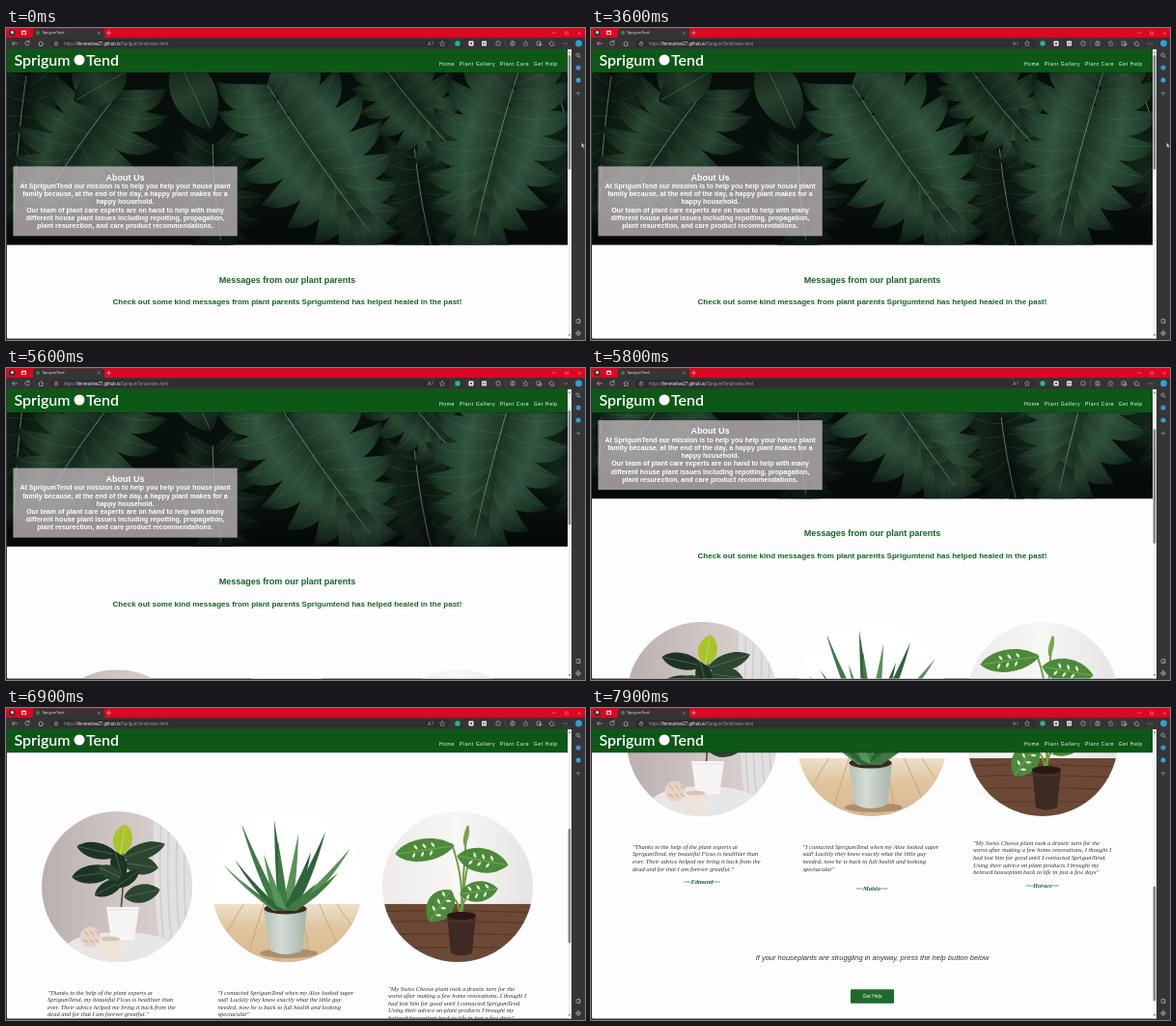
Recreate the animation shown at these times as an HTML page. Size 600 by 323 pixels, loop 8000 ms.

```html
<!DOCTYPE html>
<html lang="en">
<head>
<meta charset="utf-8">
<title>SprigumTend</title>
<style>
html, body { margin: 0; height: 100%; overflow: hidden; background: #333; }
svg { display: block; width: 100vw; height: 100vh; }
text { font-family: "Liberation Sans", Arial, sans-serif; white-space: pre; }
.serif { font-family: "Liberation Serif", "Times New Roman", serif; font-style: italic; }
.logo { font-family: Lato, "Open Sans", sans-serif; font-weight: 600; }
.mid { text-anchor: middle; }
.bold { font-weight: 700; }
.ital { font-style: italic; }
</style>
</head>
<body>
<svg id="stage" viewBox="0 0 600 323"></svg>
<script>
const { sin, PI } = Math;

// y is the vertical middle of the line
const text = (x, y, size, str, fill, cls = '', extra = '') =>
  `<text x="${x}" y="${y + size * .35}" font-size="${size}" fill="${fill}" class="${cls}" ${extra}>${str}</text>`;
const lines = (x, y, step, size, list, fill, cls) =>
  list.map((s, i) => text(x, y + i * step, size, s, fill, cls)).join('');
const rect = (x, y, w, h, fill, rx = 0) =>
  `<rect x="${x}" y="${y}" width="${w}" height="${h}" rx="${rx}" fill="${fill}"/>`;
const dot = (x, y, r, fill) => `<circle cx="${x}" cy="${y}" r="${r}" fill="${fill}"/>`;
const path = (d, fill) => `<path d="${d}" fill="${fill}"/>`;
const line = (d, stroke, width = .7) =>
  `<path d="${d}" fill="none" stroke="${stroke}" stroke-width="${width}" stroke-linecap="round"/>`;
const at = (x, y, body, turn = 0) => `<g transform="translate(${x} ${y}) rotate(${turn})">${body}</g>`;
const gradient = (id, stops, dir = 'x2="0" y2="1"') =>
  `<linearGradient id="${id}" ${dir}>${stops.map(([o, c]) => `<stop offset="${o}" stop-color="${c}"/>`).join('')}</linearGradient>`;

// A pointed leaf centred on x, y, half-length l and half-width w
const leaf = (x, y, l, w, turn, fill, vein = '#6d8a5d') =>
  at(x, y, path(`M${-l} 0C${-l * .6} ${-w * 1.4} ${l * .5} ${-w * 1.4} ${l} 0C${l * .5} ${w * 1.4} ${-l * .6} ${w * 1.4} ${-l} 0`, fill) +
    line(`M${-l * .9} 0H${l * .9}`, vein, .5), turn);

// A broad split leaf: blunt lobes along a midrib, each curving towards the tip
function frond(x, y, turn, len, width, n, tone) {
  let out = '';
  for (const side of [-1, 1]) for (let i = 0; i < n; i++) {
    const u = i / (n - 1), reach = width * (.6 + .45 * sin(PI * (.15 + .8 * u)));
    const h = len / n * .8, bend = -side * h * .6;
    const lobe = path(`M-2 ${-h * .6}C${reach * .4} ${-h * 1.2 + bend} ${reach * .85} ${-h + bend} ${reach} ${-bend}` +
      `C${reach * .8} ${h + bend} ${reach * .4} ${h * 1.2 + bend} -2 ${h * .6}`, `url(#${tone})`) +
      line(`M0 0Q${reach * .5} ${bend} ${reach * .9} ${-bend * .6}`, '#7d9a8055', .5);
    out += at(u * len * .85, 0, lobe, side * (128 - 108 * u));
  }
  return at(x, y, out + line(`M-10 0Q${len / 2} 4 ${len} 0`, '#6f8f72', .8), turn);
}

const hero = rect(1, 46, 581, 179, '#07100c') +
  frond(20, 60, 95, 130, 55, 8, 'deep') +
  frond(570, 60, 70, 150, 60, 8, 'deep') +
  frond(425, 135, 80, 100, 52, 8, 'deep') +
  frond(215, 130, 85, 90, 50, 7, 'deep') +
  frond(113, 72, 125, 125, 68, 8, 'dim') +
  frond(395, 44, 50, 110, 50, 8, 'dim') +
  leaf(98, 60, 32, 18, 150, 'url(#dim)') +
  leaf(195, 68, 42, 22, 65, 'url(#dim)') +
  frond(277, 68, 55, 175, 74, 9, 'lit') +
  frond(528, 56, 105, 165, 72, 9, 'lit') +
  rect(1, 46, 581, 179, 'url(#shade)');

const about = `<g opacity=".8">${rect(7.4, 143.3, 232.3, 72, '#bdb4b8')}</g>` +
  text(123.5, 154.5, 9, 'About Us', '#fff', 'mid bold') +
  lines(123.5, 163.6, 8.2, 7.04, [
    'At SprigumTend our mission is to help you help your house plant',
    'family because, at the end of the day, a happy plant makes for a',
    'happy household.',
    'Our team of plant care experts are on hand to help with many',
    'different house plant issues including repotting, propagation,',
    'plant resurection, and care product recommendations.'], '#fff', 'mid bold');

const ficus = rect(-78, -78, 156, 156, 'url(#wall)') +
  path('M38-78H78V78H46Q36 0 38-78', '#e2dfe0') +
  [46, 54, 63, 71].map(x => line(`M${x}-70Q${x - 4} 0 ${x + 3} 60`, '#cfcbce', 1.5)).join('') +
  `<ellipse cx="3" cy="63" rx="55" ry="16" fill="#e9e6e6"/>` +
  line('M4 26Q8-10 6-55', '#5b4a33', 1.6) +
  [[-20, -37, 22, 8, 12], [28, -37, 23, 8, -18], [-24, -13, 23, 9, -8], [25, -22, 18, 9, 8],
   [-8, 1, 17, 7, -28], [26, 7, 19, 9, -12], [2, -22, 15, 8, 75], [-6, -14, 15, 7, 25], [11, -8, 15, 6, -35]]
    .map(([x, y, l, w, r], i) => leaf(x, y, l, w, r, i % 2 ? '#2b4531' : '#1d3326')).join('') +
  leaf(6, -49, 16, 9.5, -80, '#a9c32c', '#dbe477') +
  path('M-11 21H23L18 55H-6Z', '#f6f5f4') + line('M-10 24H22', '#dcd8d6') +
  dot(-28, 52, 10.5, '#e6d3c6') +
  [-34, -28, -22].map(x => line(`M${x} 46l4 4m-4 5l4 3`, '#c59c8b', 1)).join('') +
  rect(-18, 53, 22, 22, '#eee3d7', 3) + `<ellipse cx="-7" cy="54" rx="10" ry="2.5" fill="#d7c4b2"/>`;

const spikes = [[-48, -68], [-13, -69], [12, -55], [-9, -47], [40, -57], [66, -40], [53, -14], [-54, -28],
  [-66, -23], [-47, -6], [25, -36], [-24, -34], [30, -3], [-29, 8]];
const aloe = rect(-78, -78, 156, 156, '#fff') + rect(-78, 18, 156, 60, 'url(#wood)') +
  [-64, -34, -8, 20, 48, 74].map(x => line(`M${x * .7} 18L${x * 1.25} 78`, '#bfa078', .8)).join('') +
  `<ellipse cx="2" cy="69" rx="30" ry="5" fill="#ab8f6c"/>` +
  path('M-24 22H21L16 66Q-1 74-17 66Z', 'url(#pot)') +
  `<ellipse cx="-1.5" cy="23" rx="22" ry="5.5" fill="#3b2a22"/>` +
  spikes.map(([x, y], i) => {
    const bx = -2 + x * .1, mx = (bx + x) / 2, my = y * .35 + 14;
    return path(`M${bx - 5} 25Q${mx - 4} ${my} ${x} ${y}Q${mx + 5} ${my + 3} ${bx + 5} 25`,
      ['#3f7a45', '#2f6339', '#5a9159'][i % 3]);
  }).join('');

const holes = [-9, 0, 9].map(x => leaf(x, -4, 3, 1.2, 60, '#e8eee3', 'none') + leaf(x - 3, 4, 3, 1.2, -60, '#e8eee3', 'none')).join('');
const monstera = rect(-78, -78, 156, 156, 'url(#pale)') + rect(-78, 18, 156, 60, '#6c4936') +
  [26, 37, 50, 64].map((y, i) => line(`M-78 ${y}Q${i * 20 - 30} ${y - 3} 78 ${y + 1}`, '#583827', 1.1)).join('') +
  ['M3 32Q8-5-6-44', 'M4 32Q6-20 10-62', 'M4 32Q6-5 12-28', 'M4 32Q4 10 16 8', 'M3 32Q0 5-12 14']
    .map(d => line(d, '#6f9f45', 2)).join('') +
  [[-34, -38, 31, 11, -8], [26, -27, 27, 12, 10], [22, 5, 20, 10, -8], [-18, 20, 20, 13, 125]]
    .map(([x, y, l, w, r]) => leaf(x, y, l, w, r, '#4c8a3a', '#9cc27a') + at(x, y, holes, r)).join('') +
  leaf(9, -53, 11, 2.5, -78, '#78ab4b') +
  path('M-11 29H19L15 69Q4 74-7 69Z', '#3f2923') +
  `<ellipse cx="4" cy="30" rx="15" ry="4" fill="#271812"/>` + line('M-9 36H17', '#65443a');

const photo = (x, body) => at(x, 430, `<g clip-path="url(#round)">${body}</g>`);
const quote = (x, y, list) => lines(x, y, 7.6, 6.5, list, '#333', 'serif');
const signed = (x, y, name) => text(x, y, 6.5, `~~${name}~~`, '#1a6130', 'serif mid bold');

const page = `<g clip-path="url(#hero)">${hero}</g>` + about +
  text(291.5, 260.5, 9, 'Messages from our plant parents', '#146029', 'mid bold') +
  text(291.5, 283.5, 8, 'Check out some kind messages from plant parents Sprigumtend has helped healed in the past!', '#146029', 'mid bold') +
  photo(115, ficus) + photo(291, aloe) + photo(468, monstera) +
  quote(43, 539.5, ['"Thanks to the help of the plant experts at', 'SprigumTend, my beautiful Ficus is healthier than',
    'ever. Their advice helped me bring it back from the', 'dead and for that I am forever greatful."']) +
  quote(219.5, 539.5, ['"I contacted SprigumTend when my Aloe looked super', 'sad! Luckily they knew exactly what the little guy',
    'needed, now he is back to full health and looking', 'spectacular"']) +
  quote(396, 535.5, ['"My Swiss Cheese plant took a drastic turn for the', 'worst after making a few home renovations, I thought I',
    'had lost him for good until I contacted SprigumTend.', 'Using their advice on plant products I brought my',
    'beloved houseplant back to life in just a few days"']) +
  signed(115, 576, 'Edmund') + signed(291, 582.5, 'Maisie') + signed(468, 579.5, 'Horace') +
  text(291.5, 654.5, 7.5, 'If your houseplants are struggling in anyway, press the help button below', '#333', 'mid ital') +
  rect(269, 687.3, 45, 14.4, '#1f6a2f', .8) + text(291.5, 694.3, 5.1, 'Get Help', '#fff', 'mid ital');

const header = rect(1, 46, 581, 1, '#0003') + rect(1, 22, 581, 24, '#0d5717') +
  text(8.5, 33.2, 16, 'Sprigum', '#fff', 'logo') + dot(76, 33, 5.5, '#fff') + text(83, 33.2, 16, 'Tend', '#fff', 'logo') +
  [[449, 'Home'], [470, 'Plant Gallery'], [512, 'Plant Care'], [546.8, 'Get Help']]
    .map(([x, s]) => text(x, 37.2, 5.12, s, '#fff', '', 'letter-spacing=".6"')).join('');

const grey = '#b4b4b4';
const ring = (x, y, r, stroke = grey) => `<circle cx="${x}" cy="${y}" r="${r}" fill="none" stroke="${stroke}" stroke-width=".7"/>`;
const box = (x, y, s = 4) => `<rect x="${x - s / 2}" y="${y - s / 2}" width="${s}" height="${s}" rx=".6" fill="none" stroke="${grey}" stroke-width=".7"/>`;
const star = (x, y) => line(`M${x} ${y - 2.6}l.8 1.8 1.9.2-1.4 1.3.4 1.9-1.7-1-1.7 1 .4-1.9-1.4-1.3 1.9-.2z`, grey, .5);
const plus = (x, y, c = grey) => line(`M${x - 2} ${y}h4m-2-2v4`, c, .6);

const browser = rect(0, 0, 600, 11, '#dc0722') + rect(0, 10, 600, 12, '#353535') +
  path('M26 10.5Q28 10 28 8V2Q28 .5 30 .5H100Q102 .5 102 2V8Q102 10 104 10.5Z', '#353535') +
  dot(6.5, 5, 3.2, '#243b38') + dot(6.5, 4.4, 1.5, '#d9e2dc') +
  rect(16, 2.8, 5, 4.2, '#fff', .5) + rect(16.7, 4.3, 3.6, 2, '#dc0722') +
  dot(33, 5, 2, '#2d8a3c') + text(37.5, 5, 3.9, 'SprigumTend', '#ddd') +
  line('M95 3.9l2.4 2.4m0-2.4l-2.4 2.4', grey, .4) + plus(106.5, 5, '#f5c4ca') +
  line('M566.5 5h3M593 4l2.6 2.6m0-2.6l-2.6 2.6M580 4h2.6v2.6h-2.6z', '#f5c4ca', .4) +
  rect(46, 12, 414, 8, '#2e2e2e', 4) +
  line('M11.5 16H6.5m2-2l-2 2 2 2', grey) + line('M24 14.5a2.3 2.3 0 1 0 .3 2m-.3-3.5v1.6h-1.6', grey) +
  line('M33.8 16l2.4-2.3 2.4 2.3m-4-.5v3h3.2v-3', grey) + box(52, 16.6, 2.8) + line('M51.2 15v-.7q.8-1 1.6 0v.7', grey, .5) +
  text(60, 16, 4.5, '<tspan>https://</tspan><tspan fill="#f2f2f2">finnmarlow27.github.io</tspan><tspan>/SprigumTend/index.html</tspan>', '#9a9a9a') +
  text(437, 16, 5, 'A', grey) + line('M442 14q1 1.5 0 3', grey, .5) + star(452, 16) +
  dot(468, 16, 2.7, '#1fb994') + rect(479.5, 13.5, 5, 5, '#eee', .6) + rect(481, 15, 2, 2, '#a23') +
  rect(493, 13.5, 5, 5, '#eee', .6) + line('M494.3 17v-2l1.2 1.2 1.2-1.2v2', '#333', .6) +
  box(510, 16) + line('M517.5 13v6', '#555') + box(525, 16) + line('M525 14v4', grey) + star(538.5, 16) +
  box(552, 16) + plus(553.5, 17) + line('M563 16q2-4 4-.5t-1 2.8q-2 .7-3-2.3', grey) +
  [577.5, 579.5, 581.5].map(x => dot(x, 16, .5, grey)).join('') + dot(593.5, 16, 3.4, '#2f9fd8') +
  ring(592.5, 27.8, 1.7, '#9cc4e0') + line('M593.8 29.2l1.4 1.5', '#9cc4e0') +
  dot(593, 41, 2.6, '#3f8fd0') + dot(593, 54, 2.6, '#2f9fd8') + plus(593, 67.5, '#999') +
  box(593, 303.5) + line('M594 301.7v3.6', grey) + ring(593, 316, 1.9) + ring(593, 316, .6) +
  line('M593 313.2v.5m0 4.6v.5m-2.8-2.8h.5m4.6 0h.5', grey);

const across = 'x2="1" y2="0"';
const stage = document.getElementById('stage');
stage.innerHTML = `<defs>
  <clipPath id="view"><rect x="1" y="46" width="581" height="275.4"/></clipPath>
  <clipPath id="hero"><rect x="1" y="46" width="581" height="178.5"/></clipPath>
  <clipPath id="round"><circle r="78"/></clipPath>
  ${gradient('shade', [[0, '#0003'], [.3, '#0000'], [.7, '#0001'], [1, '#0006']])}
  ${gradient('lit', [[0, '#1b3525'], [.45, '#33573f'], [.8, '#213f2d'], [1, '#0f2118']], across)}
  ${gradient('dim', [[0, '#14281b'], [.5, '#294833'], [1, '#0d1b13']], across)}
  ${gradient('deep', [[0, '#0b1610'], [.5, '#14271b'], [1, '#09120d']], across)}
  ${gradient('wall', [[0, '#b9b0ae'], [.5, '#cfc5c2'], [1, '#ddd4d2']], across)}
  ${gradient('wood', [[0, '#eee0ca'], [.4, '#dfc5a0'], [1, '#d5b88f']])}
  ${gradient('pot', [[0, '#b3bfb7'], [.4, '#d3dcd5'], [1, '#a5b3aa']], across)}
  ${gradient('pale', [[0, '#eeebea'], [.5, '#f8f7f6'], [1, '#e6e3e2']], across)}
</defs>` + rect(0, 0, 600, 323, '#353535') + browser + rect(1, 22, 585, 299.4, '#fdfdfd', 1.5) +
  `<g clip-path="url(#view)"><g id="page">${page}</g></g>` + header +
  rect(582, 22, 4, 299.4, '#f4f4f4') + path('M582.7 26.2l1.3-2 1.3 2zM582.7 317l1.3 2 1.3-2z', '#777') +
  `<g id="thumb">${rect(582.6, 28, 2.7, 118.5, '#858585', 1.3)}</g>` +
  `<path id="cursor" d="M596.3 118.5v5.4l1.3-1.2.9 2 .9-.4-.9-1.9h1.6z" fill="#ddd" stroke="#222" stroke-width=".4"/>`;

const smooth = u => u * u * (3 - 2 * u);
const glide = u => 1 - (1 - u) ** 1.5;
const moves = [[5300, 6200, 153, smooth], [6500, 7200, 128, glide], [7500, 7900, 115, smooth]];
const scrollAt = t => moves.reduce((sum, [from, to, dist, ease]) =>
  sum + dist * ease(Math.min(1, Math.max(0, (t - from) / (to - from)))), 0);

const [pageEl, thumb, cursor] = ['page', 'thumb', 'cursor'].map(id => document.getElementById(id));
function draw(now) {
  const t = Math.floor(now % 8000 / 100) * 100, y = scrollAt(t);
  pageEl.setAttribute('transform', `translate(0 ${-y})`);
  thumb.setAttribute('transform', `translate(0 ${y * .396})`);
  cursor.setAttribute('visibility', t < 5400 ? 'visible' : 'hidden');
  requestAnimationFrame(draw);
}
draw(performance.now());
</script>
</body>
</html>
```
